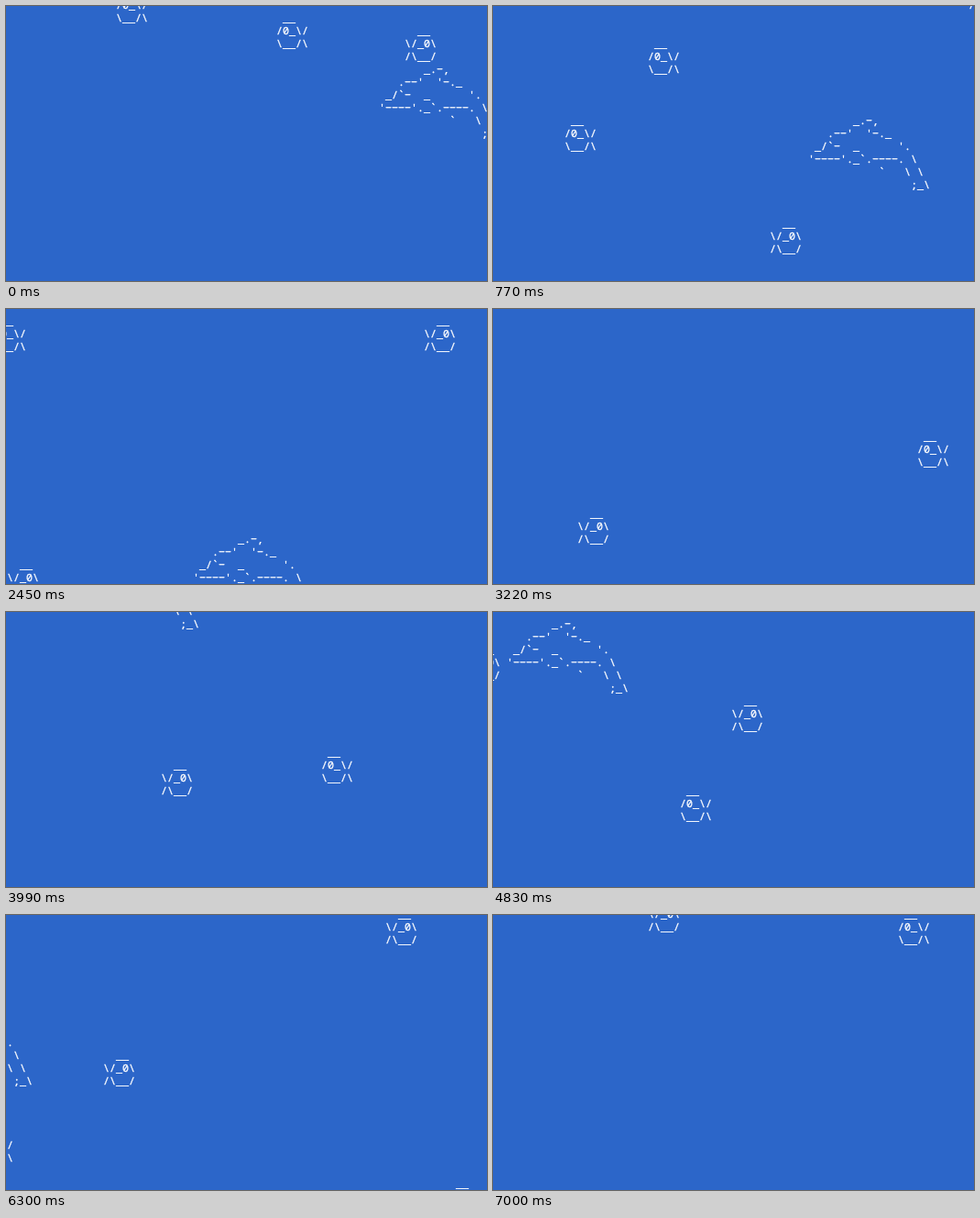
An HTML page with a canvas that plays this animation: 525x300 px, repeating every 7.07 s.

```html
<!DOCTYPE html>
<html lang="en">
<head>
<meta charset="utf-8">
<title>Text aquarium</title>
<style>
html, body { margin: 0; width: 100%; height: 100%; overflow: hidden; background: #2c66c9; }
canvas { display: block; }
</style>
</head>
<body>
<canvas id="sea" width="525" height="300"></canvas>
<script>
const ctx = document.getElementById('sea').getContext('2d');
const CELL_W = 7, CELL_H = 14, TICK = 70, TICKS = 101;

const leftFish = [' __', '/0_\\/', '\\__/\\'];
const rightFish = ['  __', '\\/_0\\', '/\\__/'];
// The wide minus sign stands in for the hyphen
const dolphin = [
  '       _.-,',
  "   .--'  '-._",
  " _/`-  _      '.",
  "'----'._`.----. \\",
  '           `   \\ \\',
  '                ;_\\'
].map(line => line.replace(/-/g, '\u2212'));

// Start cell and speed in cells per unit of progress
const swimmers = [
  { art: leftFish, x: 17.8, y: -0.6, vx: -0.3, vy: 0.505 },
  { art: leftFish, x: 42.35, y: 1.6, vx: -0.9, vy: 0.1 },
  { art: rightFish, x: 62.4, y: 2.9, vx: 0.6, vy: -0.2 },
  { art: rightFish, x: 33.9, y: -2.85, vx: 0.5, vy: 1.01 },
  { art: dolphin, x: 58.3, y: 5.55, vx: -0.45, vy: 0.205 }
];

// [tick, progress]: nearly even, with three short stalls
const pace = [
  [0, 0], [11, 20], [35, 64], [44, 81.1], [55, 99], [57, 103], [60, 110], [61, 110],
  [69, 125], [82, 148], [85, 155], [86, 155], [97, 175], [98, 175], [100, 181]
];

function progress(tick) {
  const i = Math.max(1, pace.findIndex(p => p[0] >= tick));
  const [t0, p0] = pace[i - 1], [t1, p1] = pace[i];
  return p0 + (p1 - p0) * (tick - t0) / (t1 - t0);
}

// Wrap a cell index into [min, min + size)
function wrap(v, min, size) {
  return ((Math.floor(v) - min) % size + size) % size + min;
}

function drawArt(art, col, row) {
  art.forEach((line, j) => {
    [...line].forEach((ch, i) => {
      if (ch === ' ') return;
      const x = (col + i) * CELL_W + 1, y = (row + j) * CELL_H + 3;
      ctx.fillText(ch, x, y);
      ctx.strokeText(ch, x, y);
    });
  });
}

function draw(tick) {
  const p = progress(tick);
  ctx.fillStyle = '#2c66c9';
  ctx.fillRect(0, 0, 525, 300);
  ctx.fillStyle = ctx.strokeStyle = '#fff';
  ctx.lineWidth = 0.3;
  ctx.font = '500 11.667px "Noto Sans Mono", monospace';
  for (const s of swimmers) {
    drawArt(s.art, wrap(s.x + s.vx * p, -25, 100), wrap(s.y + s.vy * p, -8, 30));
  }
}

function loop() {
  draw(Math.floor(performance.now() / TICK) % TICKS);
  requestAnimationFrame(loop);
}
loop();
</script>
</body>
</html>
```
